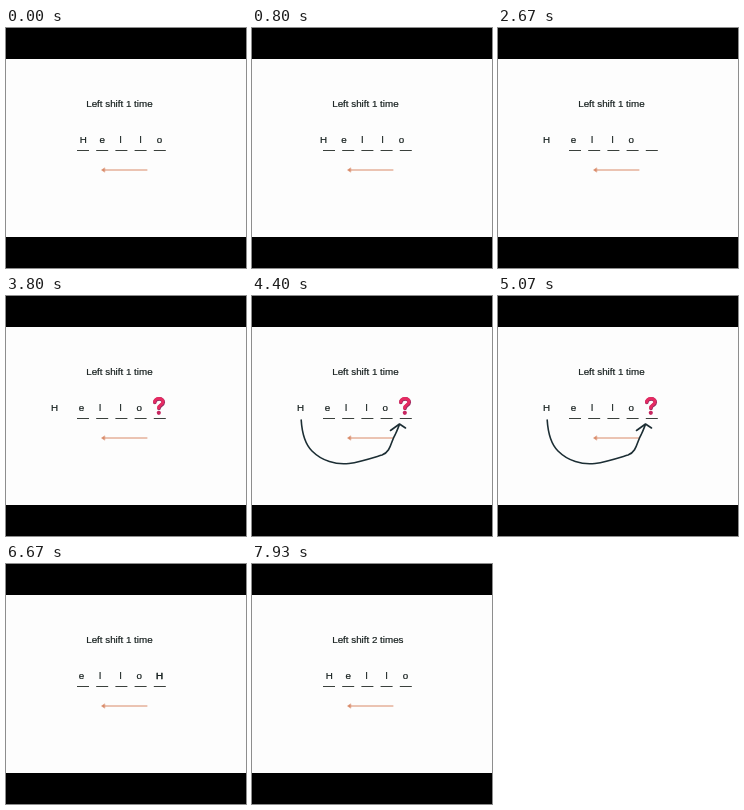
An HTML page that plays this animation: 240x240 px, repeating every 8000 ms.

```html
<!DOCTYPE html>
<html lang="en">
<head>
<meta charset="utf-8">
<title>Left shift</title>
<style>
  html, body { margin: 0; width: 100%; height: 100%; overflow: hidden; background: #000; }
  svg { display: block; width: 100%; height: 100%; }
  text { font: 9.8px "Liberation Sans", Arial, sans-serif; fill: #17201f; stroke: #17201f; stroke-width: .2; }
  .letter { text-anchor: middle; }
  path { fill: none; stroke-linecap: round; stroke-linejoin: round; }
</style>
</head>
<body>
<svg viewBox="0 0 240 240">
  <rect y="31" width="240" height="178" fill="#fdfdfd"/>
  <text id="title" x="80.2" y="79.2"></text>
  <g id="slots" stroke="#3a403c" stroke-width="1"></g>
  <g stroke="#d98a68">
    <path d="M97 142H141" stroke-width="1"/>
    <path d="M98.5 140L95.5 142L98.5 144Z" stroke-width=".5" style="fill:#d98a68"/>
  </g>
  <g id="letters"></g>
  <g id="question" transform="translate(0 -.8)">
    <path d="M148.8 107.2C148.8 102.8 157.3 102.4 157.3 107C157.3 110.2 153 109.8 153 113.2" stroke="#8f2a60" stroke-width="3.6"/>
    <path d="M148.6 106.8C148.6 102.4 157 102 157 106.6C157 109.8 152.6 109.4 152.6 112.8" stroke="#e52b62" stroke-width="3"/>
    <circle cx="152.8" cy="117.6" r="2.1" fill="#c62660"/>
  </g>
  <path id="wrap" d="M49.2 124C50 137 53 148 60 155C70 165 84 169 97 167.5C108 166 120 162 130 159C139 156 139 145 143 139C145 135 146 132 147.5 128.5M138.5 134.5L147.5 128L153.5 132"
        stroke="#1c2e34" stroke-width="1.6"/>
</svg>
<script>
const LOOP = 8000;
const SHIFT = [600, 1300];
const QUESTION_AT = 3200, WRAP_AT = 4400, ROTATE_AT = 5900, NEXT_AT = 7300;
const slotX = [77.2, 96.2, 114.5, 134.5, 153.5];
const shiftedX = [48.5, 75.5, 94, 114.5, 133.2];

const byId = id => document.getElementById(id);
const add = (parent, tag, attributes) => {
  const node = document.createElementNS("http://www.w3.org/2000/svg", tag);
  for (const name in attributes) node.setAttribute(name, attributes[name]);
  return parent.appendChild(node);
};
const show = (node, visible) => node.setAttribute("visibility", visible ? "visible" : "hidden");

for (let i = 0; i < 5; i++) {
  const x = 71 + 19.2 * i;
  add(byId("slots"), "line", { x1: x, x2: x + 12, y1: 122.5, y2: 122.5 });
}
const letters = [..."Hello"].map(char => {
  const node = add(byId("letters"), "text", { class: "letter", y: 114.8 });
  node.textContent = char;
  return node;
});

function ease(time, [start, end]) {
  const p = Math.min(1, Math.max(0, (time - start) / (end - start)));
  return p * p * (3 - 2 * p);
}

function draw(now) {
  const time = now % LOOP;
  const next = time >= NEXT_AT;
  const rotated = time >= ROTATE_AT && !next;
  const shift = next ? 0 : ease(time, SHIFT);

  byId("title").textContent = next ? "Left shift 2 times" : "Left shift 1 time";
  letters.forEach((node, i) => {
    const x = slotX[i] + (shiftedX[i] - slotX[i]) * shift;
    node.setAttribute("x", rotated && i === 0 ? slotX[4] : x);
  });
  letters[0].style.strokeWidth = rotated ? .5 : .2;
  show(byId("question"), time >= QUESTION_AT && time < ROTATE_AT);
  show(byId("wrap"), time >= WRAP_AT && time < ROTATE_AT);
  requestAnimationFrame(draw);
}
draw(performance.now());
</script>
</body>
</html>
```
